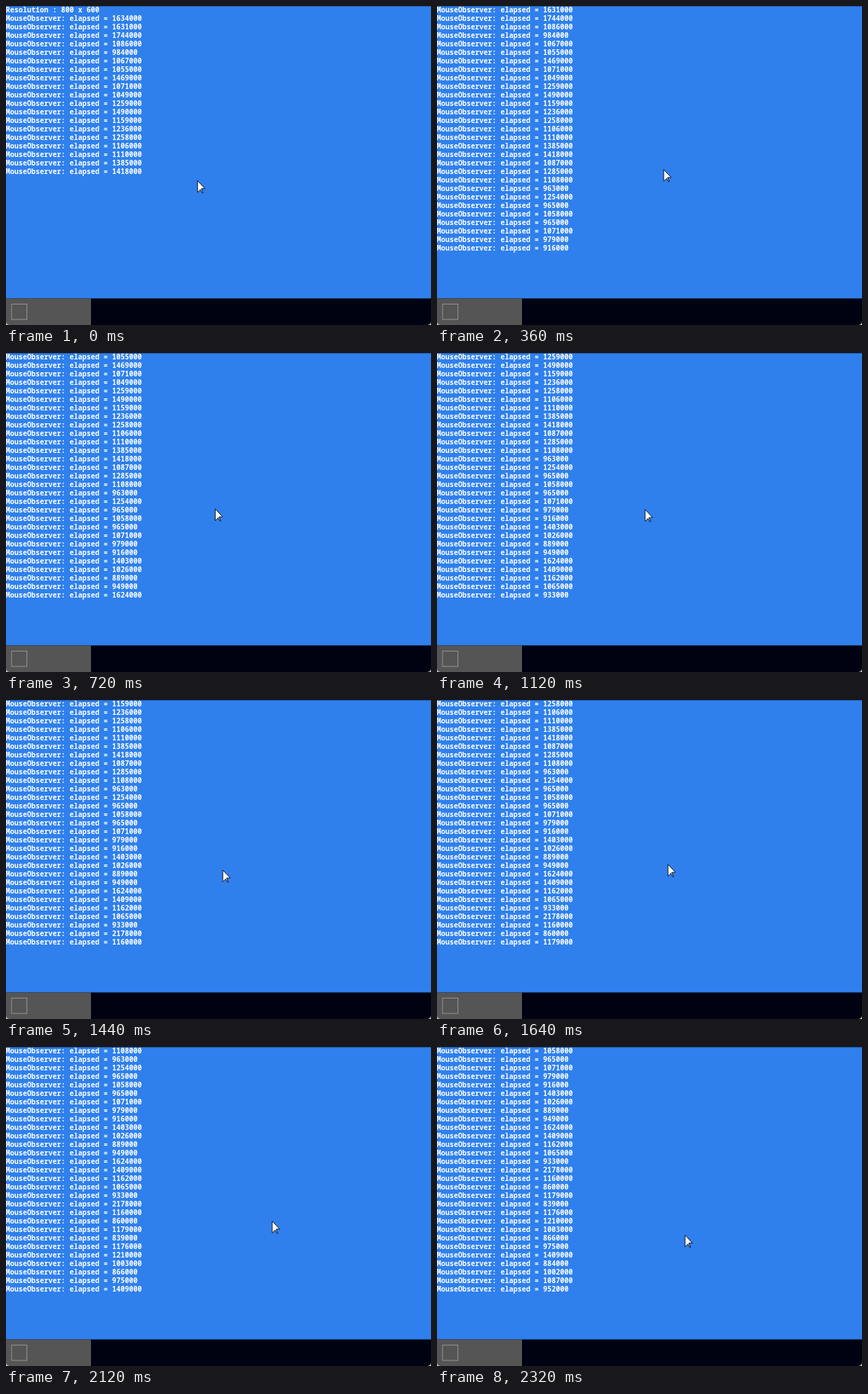
These frames come from a looping animation (600 px wide and 450 px high, 2.6 s). An HTML page with a canvas:

```html
<!DOCTYPE html>
<html lang="en">
<head>
<meta charset="utf-8">
<title>Mouse log</title>
<style>
  html, body { margin: 0; width: 100%; height: 100%; overflow: hidden; }
  canvas { display: block; }
</style>
</head>
<body>
<canvas id="stage" width="600" height="450"></canvas>
<script>
const ctx = document.getElementById('stage').getContext('2d');
const LOOP = 2600, TICK = 40, ROWS = 29, LINE = 12;

// Elapsed times in thousands
const elapsed = [
  1634, 1631, 1744, 1086, 984, 1067, 1055, 1469, 1071, 1049, 1259, 1490, 1159, 1236,
  1258, 1106, 1110, 1385, 1418, 1087, 1285, 1108, 963, 1254, 965, 1058, 965, 1071,
  979, 916, 1403, 1026, 889, 949, 1624, 1409, 1162, 1065, 933, 2178, 1160, 860,
  1179, 839, 1176, 1210, 1003, 866, 975, 1409, 884, 1002, 1087, 952
];
const log = ['Resolution : 800 x 600', ...elapsed.map(n => `MouseObserver: elapsed = ${n}000`)];

// time, pointer x, pointer y, lines printed
const keys = [
  [0, 270, 246, 20], [360, 319.7, 230.3, 31], [560, 303.5, 222, 34], [720, 295, 219.5, 36],
  [1120, 293.5, 220.5, 40], [1280, 293.5, 220.5, 40], [1440, 305.7, 239.5, 42],
  [1880, 349.8, 222, 48], [2000, 371, 229, 50], [2100, 377, 243, 51.6],
  [2220, 368, 257, 53.5], [2320, 349.8, 265, 55], [LOOP, 349.8, 265, 55]
];

function stateAt(t) {
  const i = keys.findIndex(k => k[0] > t);
  const a = keys[i - 1], b = keys[i];
  const p = (t - a[0]) / (b[0] - a[0]);
  return a.map((v, j) => v + (b[j] - v) * p).slice(1);
}

function rect(color, x, y, w, h) {
  ctx.fillStyle = color;
  ctx.fillRect(x, y, w, h);
}

function drawDesktop() {
  rect('#2f80ed', 0, 0, 600, 450);
  rect('rgba(0,0,0,.35)', 0, 0, 600, 0.8);
  rect('#000211', 0, 412.5, 600, 37.5);
  rect('#555', 0, 412.5, 120, 37.5);
  ctx.strokeStyle = '#a3a3a3';
  ctx.lineWidth = 0.8;
  ctx.strokeRect(7.9, 420.4, 21.7, 21.7);
}

// Rounded lower window corners
function drawCorners() {
  ctx.fillStyle = '#c8c8c8';
  ctx.beginPath();
  ctx.rect(0, 440, 600, 10);
  ctx.roundRect(0, 430, 600, 20, [0, 0, 5, 5]);
  ctx.save();
  ctx.clip('evenodd');
  ctx.fillRect(0, 440, 600, 10);
  ctx.restore();
}

function drawLog(count) {
  ctx.fillStyle = '#fff';
  ctx.font = 'bold 10px "Noto Sans Mono", "DejaVu Sans Mono", monospace';
  ctx.textBaseline = 'alphabetic';
  log.slice(Math.max(0, count - ROWS), count)
    .forEach((text, i) => ctx.fillText(text, -0.3, 9 + i * LINE));
}

const pointer = new Path2D('M.5.5L14.5 15.5H7.8L11 23.5H9.3L6 17.3L.5 22.5Z');

function drawPointer(x, y) {
  ctx.save();
  ctx.translate(x, y);
  ctx.scale(0.75, 0.75);
  ctx.fillStyle = '#fff';
  ctx.strokeStyle = '#000';
  ctx.lineWidth = 1.2;
  ctx.fill(pointer);
  ctx.stroke(pointer);
  ctx.restore();
}

const start = performance.now();

function frame() {
  const t = (performance.now() - start) % LOOP;
  const [x, y, count] = stateAt(Math.floor(t / TICK) * TICK);
  drawDesktop();
  drawLog(Math.floor(count + 1e-6));
  drawPointer(x, y);
  drawCorners();
  requestAnimationFrame(frame);
}
frame();
</script>
</body>
</html>
```
